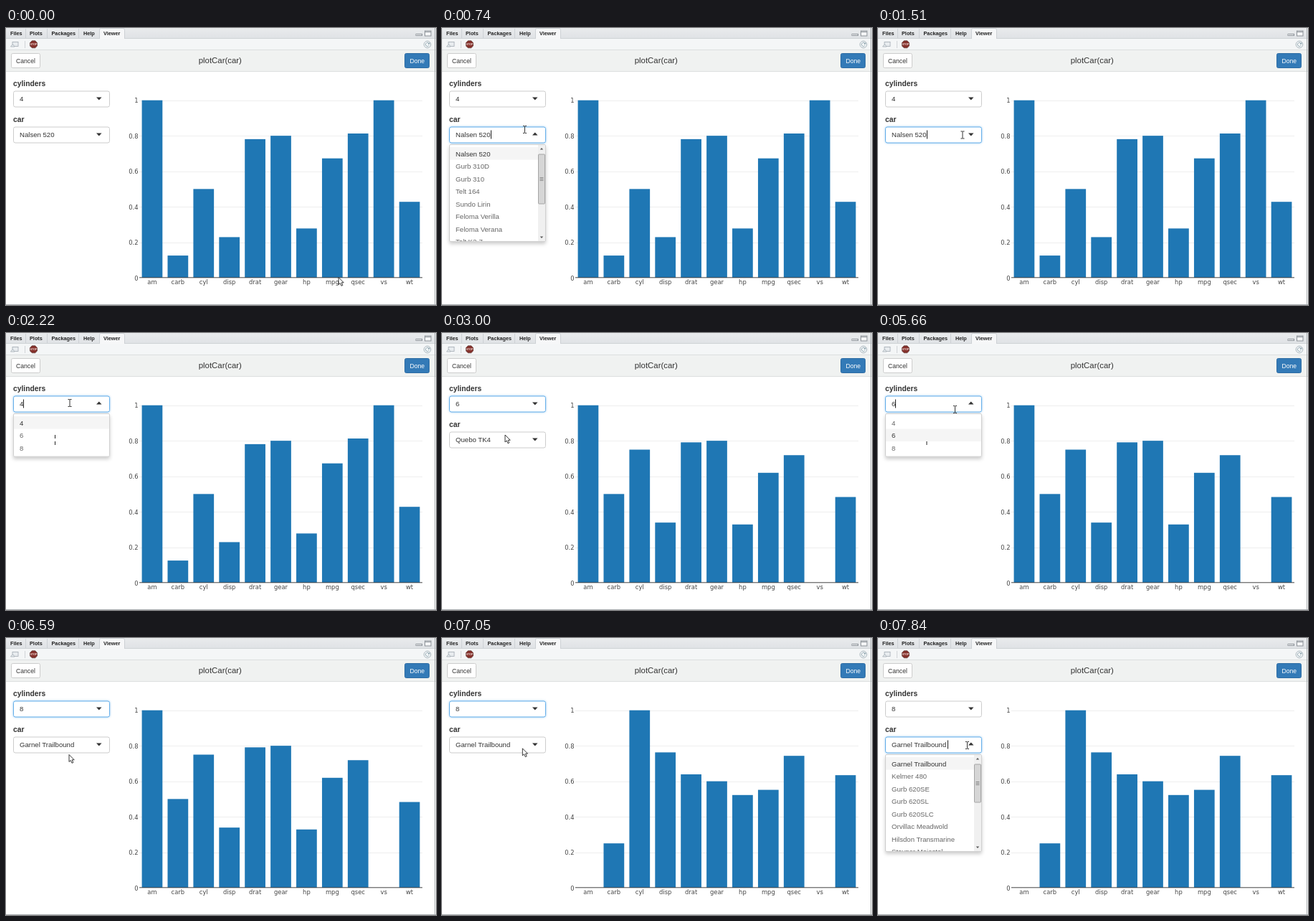
Animation of 600x386 px, one loop 8 s. Source, as an HTML page:

```html
<!DOCTYPE html>
<html lang="en">
<head>
<meta charset="utf-8">
<title>plotCar(car)</title>
<style>
  html, body { margin: 0; width: 100%; height: 100%; overflow: hidden; background: #fff; }
  svg { display: block; width: 600px; height: 386px; }
  text { font-family: "Liberation Sans", Arial, sans-serif; font-size: 9.6px; fill: #333; }
  .tab { font-size: 7.3px; font-weight: bold; fill: #222; }
  .label { font-size: 10.3px; font-weight: bold; }
  .title { font-size: 11.4px; text-anchor: middle; }
  .button { font-size: 8.6px; text-anchor: middle; }
  .tick { font-family: "DejaVu Sans", Verdana, sans-serif; font-size: 8.4px; fill: #444; }
  .item { fill: #666; }
  .item.active { fill: #333; }
  .box { fill: #fff; stroke: #ccc; }
  .focus .box { stroke: #66afe9; filter: drop-shadow(0 0 1.5px rgba(102, 175, 233, .7)); }
  .panel { fill: #fff; stroke: #d0d0d0; filter: drop-shadow(0 3px 2.5px rgba(0, 0, 0, .2)); }
  .caret { stroke: #222; }
</style>
</head>
<body>
<svg id="stage" viewBox="0 0 600 386">
  <defs>
    <linearGradient id="tabs" x2="0" y2="1">
      <stop stop-color="#e9ebed"/><stop offset="1" stop-color="#dfe2e5"/>
    </linearGradient>
  </defs>

  <!-- window chrome -->
  <rect width="600" height="15" fill="url(#tabs)"/>
  <path d="M0 14.5H600" stroke="#cfd3d6"/>
  <path d="M27.5 1V14M57.5 1V14M101.5 1V14" stroke="#cdd1d5"/>
  <rect y="15" width="600" height="15" fill="#f4f6f7"/>
  <path d="M130.5 15V2.5Q130.500 .5 132.500 .5H163Q165.500 .5 165.500 2.500V15" fill="#f6f7f8" stroke="#cdd1d5"/>
  <text class="tab" x="6" y="9.800">Files</text>
  <text class="tab" x="33" y="9.800">Plots</text>
  <text class="tab" x="63.500" y="9.800">Packages</text>
  <text class="tab" x="108" y="9.800">Help</text>
  <text class="tab" x="136" y="9.800">Viewer</text>
  <g fill="#f5f6f7" stroke="#8d9399">
    <rect x="572" y="8.500" width="8.500" height="2"/>
    <rect x="584.500" y="4" width="8.500" height="7"/>
    <path d="M584.500 5.500H593"/>
  </g>
  <g fill="#e8ecef" stroke="#a3abb3" stroke-width=".8">
    <rect x="9" y="19.500" width="8" height="6"/>
    <path d="M6.500 26L9.500 22.500L12 26Z"/>
  </g>
  <path d="M26.500 18V28" stroke="#d0d4d7"/>
  <path d="M36.300 17.800H40.700L43.500 20.600V25L40.700 27.800H36.300L33.500 25V20.600Z" fill="#85302b" stroke="#5c3a36" stroke-width=".7"/>
  <text x="38.500" y="24.200" text-anchor="middle" style="font-size:3.600px;font-weight:bold;fill:#f0dcd8">STOP</text>
  <circle cx="588" cy="23" r="4.800" fill="#f7f9fa" stroke="#a9b6bd"/>
  <path d="M590.500 22A2.600 2.600 0 1 0 590.300 24.300M590.800 20.300V22.300H588.800" fill="none" stroke="#7d97a3" stroke-width=".9"/>

  <!-- title bar -->
  <rect y="30" width="600" height="31" fill="#f0f2f1"/>
  <path d="M0 30.500H600M0 60.500H600" stroke="#dcdfdf"/>
  <rect class="box" x="7.500" y="35.500" width="40" height="20" rx="2"/>
  <text class="button" x="27.500" y="48.800">Cancel</text>
  <text class="title" x="298.800" y="49">plotCar(car)</text>
  <rect x="556.500" y="35.500" width="34" height="20" rx="2" fill="#337ab7" stroke="#2e6da4"/>
  <text class="button" x="573.700" y="48.800" style="fill:#fff">Done</text>

  <text class="label" x="10" y="81">cylinders</text>
  <text class="label" x="10" y="131">car</text>

  <g id="chart"></g>
  <g id="car"></g>
  <g id="cyl"></g>
  <path d="M598.500 0V386M0 385.500H600" stroke="#a9adb0"/>

  <g id="pointer">
    <path id="arrow" d="M0 0V10L2.300 8L4 11.800L5.800 11L4.200 7.300H7.200Z" fill="#fff" stroke="#222" stroke-width=".9"/>
    <path id="beam" d="M-2.500 -5H-.7L0 -4.500L.7 -5H2.500M0 -4.500V4.500M-2.500 5H-.7L0 4.500L.7 5H2.500" fill="none" stroke="#333"/>
  </g>
</svg>

<script>
const LOOP = 8000;
const $ = id => document.getElementById(id);

// chart
const VARS = "am carb cyl disp drat gear hp mpg qsec vs wt".split(" ");
const MAXIMA = [1, 8, 8, 472, 4.93, 5, 335, 33.9, 22.9, 1, 5.424];
const CARS = {
  4: [1, 1, 4, 108, 3.85, 4, 93, 22.8, 18.61, 1, 2.32],
  6: [1, 4, 6, 160, 3.9, 4, 110, 21, 16.46, 0, 2.62],
  8: [0, 2, 8, 360, 3.15, 3, 175, 18.7, 17.02, 0, 3.44]
};
const LEFT = 186, RIGHT = 581, BASE = 348, HEIGHT = 247.3;
const SLOT = (RIGHT - LEFT) / VARS.length;

function drawChart(cyl) {
  let out = "";
  for (let i = 0; i <= 5; i++) {
    const y = BASE - HEIGHT * i / 5;
    if (i) out += `<path d="M${LEFT} ${Math.round(y) + .5}H${RIGHT}" stroke="#eee"/>`;
    out += `<text class="tick" x="184.500" y="${y + 3.7}" text-anchor="end">${i / 5}</text>`;
  }
  VARS.forEach((name, i) => {
    const mid = LEFT + SLOT * (i + .5), h = HEIGHT * CARS[cyl][i] / MAXIMA[i];
    out += `<rect x="${mid - SLOT * .4}" y="${BASE - h}" width="${SLOT * .8}" height="${h}" fill="#1f77b4"/>
      <text class="tick" x="${mid}" y="357" text-anchor="middle">${name}</text>`;
  });
  return out + `<path d="M${LEFT} 347.800H${RIGHT}" stroke="#444"/>`;
}

// select boxes and menus
const MODELS = {
  4: ["Nalsen 520", "Gurb 310D", "Gurb 310", "Telt 164", "Sundo Lirin", "Feloma Verilla", "Feloma Verana", "Telt K2-7"],
  6: ["Quebo TK4", "Quebo TK4 Wag", "Garnel 4 Drive", "Ardient", "Gurb 350", "Gurb 350C", "Sorvali Peno"],
  8: ["Garnel Trailbound", "Kelmer 480", "Gurb 620SE", "Gurb 620SL", "Gurb 620SLC", "Orvillac Meadwold", "Hilsdon Transmarine", "Stavner Majestal"]
};
const THUMB = { 4: 69, 6: 0, 8: 53 };
const CARET = { 4: 68.5, 6: 68.5, 8: 97.5 };
const ROW = 17.55;

function drawSelect(top, value, { focus, open, caretX }) {
  const y = top + 11;
  const arrow = open ? `M126 ${y + 1}h7.500l-3.750 -4z` : `M126 ${y - 2}h7.500l-3.750 4z`;
  const caret = caretX ? `<path class="caret" d="M${caretX} ${y - 6}v12"/>` : "";
  return `<g class="${focus ? "focus" : ""}">
    <rect class="box" x="10.500" y="${top + .5}" width="134" height="22" rx="2.500"/>
    <text x="19" y="${top + 14.5}">${value}</text>
    <path d="${arrow}" fill="#333"/>${caret}</g>`;
}

function drawScrollbar(top, height, thumb) {
  const mid = top + 13.5 + thumb / 2;
  return `<rect x="134" y="${top + .5}" width="10" height="${height - 1}" fill="#f0f0f0"/>
    <path d="M136.800 ${top + 7}h4.400l-2.200 -2.600zM136.800 ${top + height - 7}h4.400l-2.200 2.600z" fill="#555"/>
    <rect x="134.500" y="${top + 13.5}" width="9" height="${thumb}" rx="1" fill="#d6d6d6" stroke="#a5a5a5"/>
    <path d="M136.500 ${mid - 2}h5m-5 2h5m-5 2h5" stroke="#777" stroke-width=".8"/>`;
}

function drawMenu(top, items, active, thumb) {
  const height = thumb ? 135 : items.length * ROW + 7;
  const rows = items.map((name, i) => {
    const on = i === active;
    const bar = on ? `<rect x="11" y="${top + 3.5 + i * ROW}" width="133" height="${ROW}" fill="#f5f5f5"/>` : "";
    return `${bar}<text class="item ${on ? "active" : ""}" x="19" y="${top + 16 + i * ROW}">${name}</text>`;
  }).join("");
  return `<rect class="panel" x="10.500" y="${top}" width="134" height="${height}" rx="1.500"/>
    <svg x="0" y="${top}" width="146" height="${height - .5}" viewBox="0 ${top} 146 ${height - .5}">${rows}</svg>
    ${thumb ? drawScrollbar(top, height, thumb) : ""}`;
}

// state changes: [time, patch]
const START = { cyl: 4, car: 4, plot: 4, focus: "", open: "", caret: false, hover: 0, trace: "" };
const CHANGES = [
  [740, { focus: "car", open: "car", caret: true }],
  [1140, { caret: false }],
  [1210, { caret: true }],
  [1360, { open: "" }],
  [2070, { focus: "cyl", open: "cyl", trace: "M68.500 142v5m0 4v5" }],
  [2690, { hover: 1 }],
  [2770, { cyl: 6, open: "", caret: false, trace: "" }],
  [2920, { car: 6 }],
  [3000, { plot: 6 }],
  [3680, { focus: "car", open: "car", caret: true }],
  [4710, { open: "" }],
  [5660, { focus: "cyl", open: "cyl", trace: "M68 151v5" }],
  [6290, { hover: 2 }],
  [6490, { cyl: 8, open: "", caret: false, trace: "" }],
  [6590, { car: 8 }],
  [6670, { plot: 8 }],
  [7610, { focus: "car" }],
  [7760, { open: "car", caret: true }]
];

// pointer moves: [start, end, steps, x, y, shape on arrival]
const MOVES = [
  [70, 520, 7, 115.5, 141.5, "beam"],
  [890, 890, 1, 116.5, 141.5, "beam"],
  [1140, 1210, 2, 118, 149, "beam"],
  [1740, 2000, 4, 89, 97.5, "beam"],
  [2370, 2690, 5, 88, 142, "arrow"],
  [3320, 3600, 5, 114, 158, "beam"],
  [3930, 3930, 1, 110.5, 152, "beam"],
  [5110, 5340, 4, 108, 110, "arrow"],
  [5490, 5490, 1, 107.5, 111.5, "beam"],
  [5660, 5660, 1, 107.5, 106.5, "beam"],
  [5890, 6290, 6, 88, 162.5, "arrow"],
  [6810, 7210, 6, 124.5, 149.5, "beam"]
];

function pointerAt(t) {
  let p = { x: 464, y: 347.5, shape: "arrow" };
  for (const [start, end, steps, x, y, shape] of MOVES) {
    if (t < start) break;
    const gap = (end - start) / Math.max(1, steps - 1);
    const k = t >= end ? 1 : (Math.floor((t - start) / gap) + 1) / steps;
    p = { x: p.x + (x - p.x) * k, y: p.y + (y - p.y) * k, shape: k === 1 ? shape : "arrow" };
  }
  return p;
}

function render(s) {
  $("chart").innerHTML = drawChart(s.plot);
  const options = (id, caretX) => ({
    focus: s.focus === id, open: s.open === id, caretX: s.focus === id && s.caret && caretX
  });
  $("car").innerHTML = drawSelect(137.5, MODELS[s.car][0], options("car", CARET[s.car])) +
    (s.open === "car" ? drawMenu(162.5, MODELS[s.car], 0, THUMB[s.car]) : "");
  $("cyl").innerHTML = drawSelect(87.5, s.cyl, options("cyl", 24.5)) +
    (s.open === "cyl" ? drawMenu(112.5, [4, 6, 8], s.hover) : "") +
    `<path class="caret" d="${s.trace}"/>`;
}

let shown = -1;
function frame(now) {
  const t = now % LOOP;
  const past = CHANGES.filter(c => c[0] <= t);
  if (past.length !== shown) {
    shown = past.length;
    render(Object.assign({}, START, ...past.map(c => c[1])));
  }
  const p = pointerAt(t);
  $("pointer").setAttribute("transform", `translate(${p.x} ${p.y})`);
  $("arrow").style.display = p.shape === "arrow" ? "" : "none";
  $("beam").style.display = p.shape === "beam" ? "" : "none";
  requestAnimationFrame(frame);
}
frame(performance.now());
</script>
</body>
</html>
```
